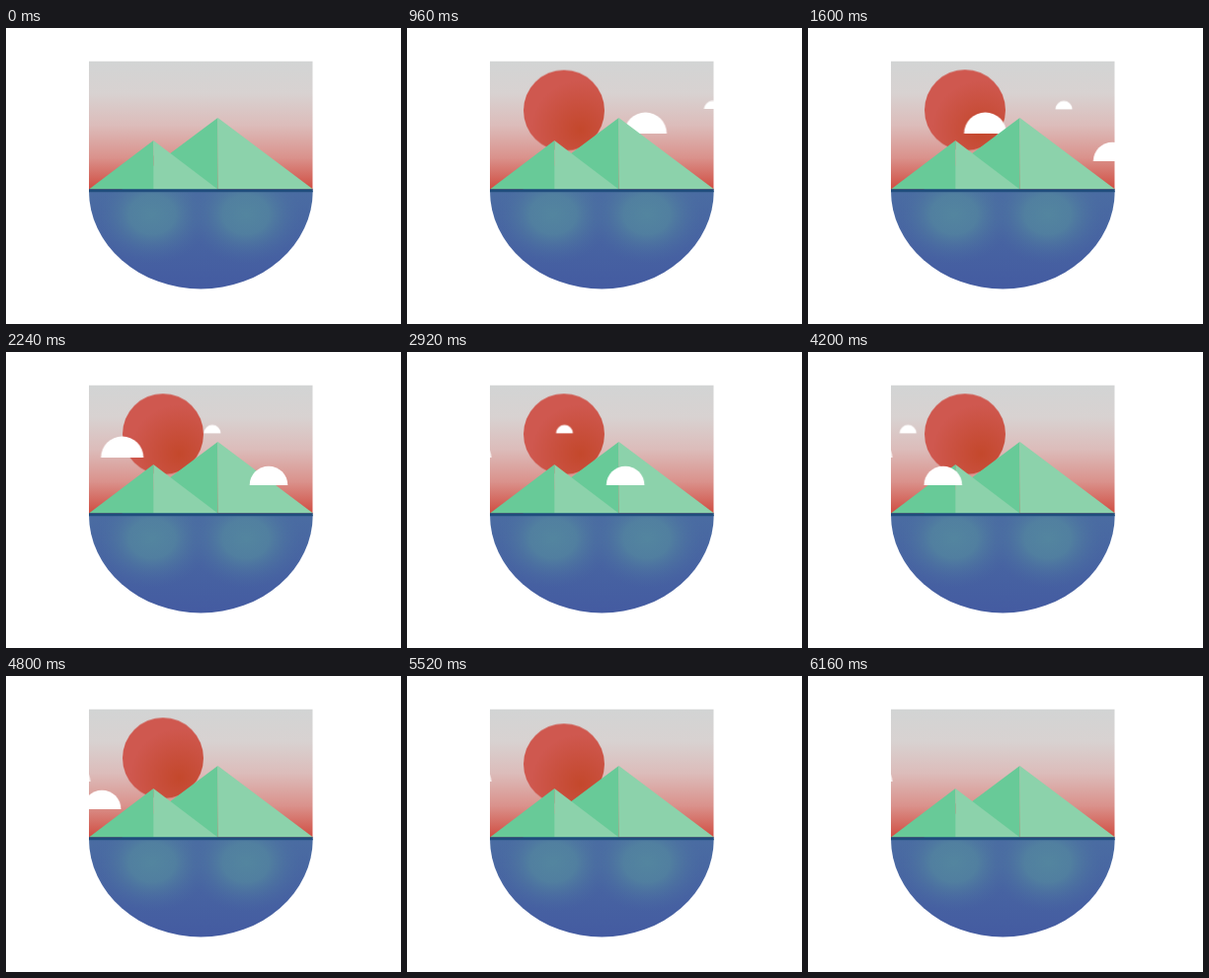
An HTML page that plays this animation: 400x300 px, repeating every 6800 ms.

```html
<!DOCTYPE html>
<html lang="en">
<head>
<meta charset="utf-8">
<title>Mountain lake</title>
<style>
  html, body { margin: 0; width: 100%; height: 100%; overflow: hidden; background: #fff; }
  svg { display: block; width: 100%; height: 100%; }

  .sun, .cloud { animation: 6800ms linear infinite; }
  .cloud { fill: #fff; }
  .sun { animation-name: sun; }
  .mid { animation-name: mid; }
  .small { animation-name: small; }
  .low { animation-name: low; }

  @keyframes sun {
    0%, 5.2941% { transform: translate(159px, 169.3px); animation-timing-function: cubic-bezier(.6, 0, .4, 1); }
    14.7059%, 77.6471% { transform: translate(159px, 83.3px); animation-timing-function: cubic-bezier(.66, 0, .5, 1); }
    91.1765%, 100% { transform: translate(159px, 169.3px); }
  }
  @keyframes mid {
    0% { transform: translate(334.4px, 107px); }
    41.1765%, 100% { transform: translate(63.6px, 107px); }
  }
  @keyframes small {
    0%, 11.7647% { transform: translate(322px, 82.4px); }
    41.1765% { transform: translate(165px, 82.4px); }
    70.5882%, 100% { transform: translate(74px, 82.4px); }
  }
  @keyframes low {
    0%, 18.2353% { transform: translate(332px, 135px); }
    78.2353%, 100% { transform: translate(62.9px, 135px); }
  }
</style>
</head>
<body>
<svg viewBox="0 0 400 300">
  <defs>
    <linearGradient id="sky" x2="0" y2="1">
      <stop offset="0" stop-color="#d2d4d4"/>
      <stop offset=".25" stop-color="#d8d2d1"/>
      <stop offset=".5" stop-color="#dcbcba"/>
      <stop offset=".75" stop-color="#da928c"/>
      <stop offset="1" stop-color="#d04c40"/>
    </linearGradient>
    <radialGradient id="fire" cx=".7" cy=".74" r=".6">
      <stop offset="0" stop-color="#c4482c"/>
      <stop offset=".4" stop-color="#c84e3a"/>
      <stop offset="1" stop-color="#cf584f"/>
    </radialGradient>
    <linearGradient id="water" x2="0" y2="1">
      <stop offset="0" stop-color="#4a6ca2"/>
      <stop offset="1" stop-color="#445ba1"/>
    </linearGradient>
    <radialGradient id="glow">
      <stop offset="0" stop-color="#53859f"/>
      <stop offset=".4" stop-color="#53859f" stop-opacity=".8"/>
      <stop offset="1" stop-color="#4a6ca2" stop-opacity="0"/>
    </radialGradient>
    <clipPath id="frame"><path d="M84 33.5H310.7V164H84Z"/></clipPath>
    <clipPath id="bowl"><path id="lake" d="M84 165A113.35 99.4 0 0 0 310.7 165Z"/></clipPath>
  </defs>

  <g clip-path="url(#frame)">
    <path fill="url(#sky)" d="M84 33.5H310.7V164H84Z"/>
    <circle class="sun" r="41" fill="url(#fire)"/>
    <path class="cloud mid" d="M-21.5 0A21.5 21.5 0 0 1 21.5 0Z"/>
    <path class="cloud small" d="M-8.5 0A8.5 8.5 0 0 1 8.5 0Z"/>
    <path fill="#68ca98" d="M214.5 91V164H117Z"/>
    <path fill="#8cd2ab" d="M214.5 91L311 163.5H214.5Z"/>
    <path fill="#68ca98" d="M149.3 114V163.5H84Z"/>
    <path fill="#8cd2ab" d="M149.3 114L214.5 163.5H149.3Z"/>
    <path class="cloud low" d="M-19.3 0A19.3 19.3 0 0 1 19.3 0Z"/>
  </g>

  <use href="#lake" fill="url(#water)"/>
  <g clip-path="url(#bowl)" fill="url(#glow)">
    <ellipse cx="148" cy="189" rx="58" ry="50"/>
    <ellipse cx="243" cy="189" rx="58" ry="50"/>
  </g>
  <path fill="#1f4c7c" d="M84 163.3H310.7V166.3H84Z"/>
</svg>
</body>
</html>
```
